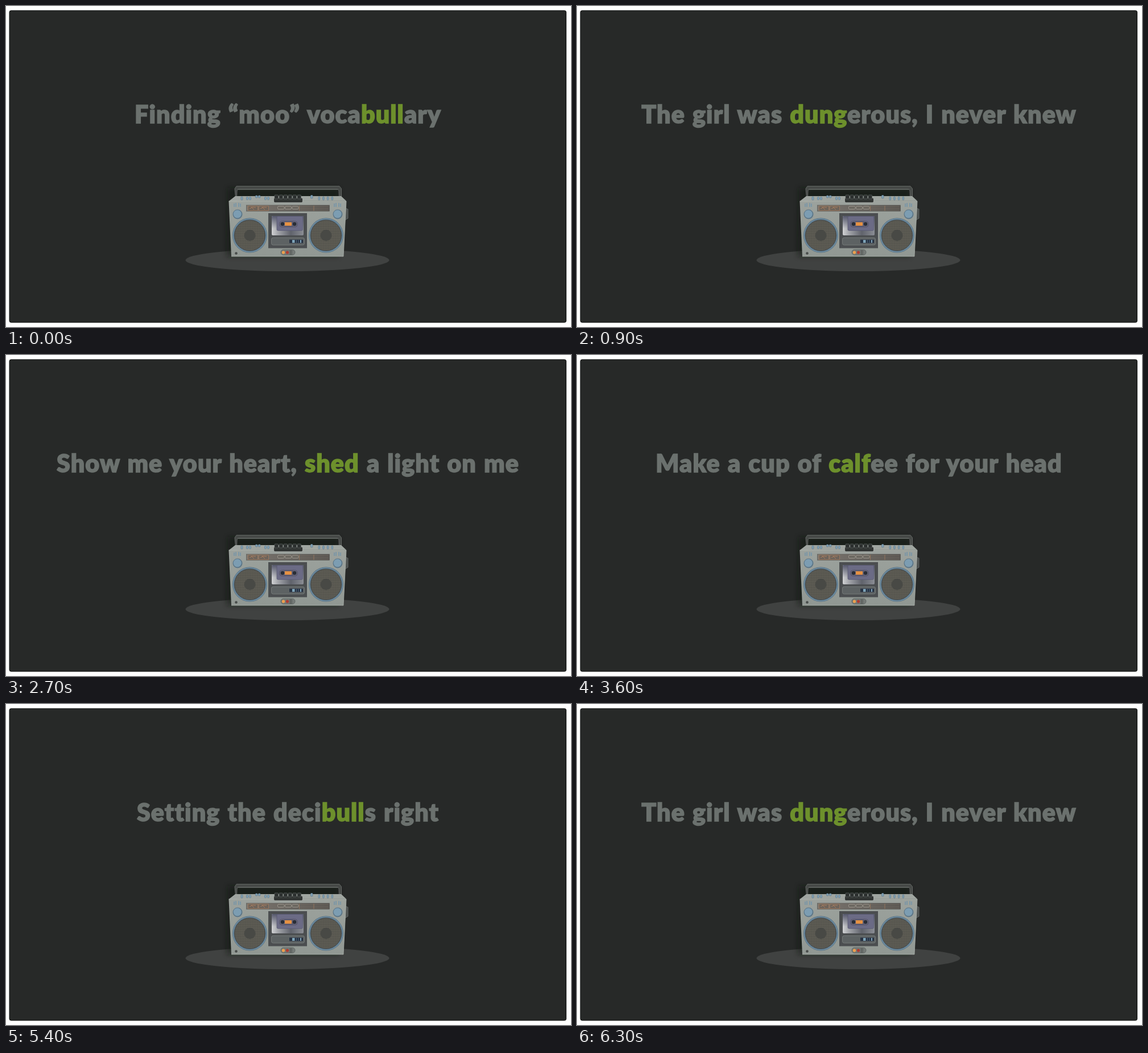
Animation of 993x564 px, one loop 7200 ms. Source, as an HTML page:

```html
<!DOCTYPE html>
<html lang="en">
<head>
<meta charset="utf-8">
<title>Boombox lyrics</title>
<style>
  html, body { margin: 0; width: 100%; height: 100%; overflow: hidden; background: #fefefe; }
  svg { display: block; width: 100vw; height: 100vh; }
  #lyric { font: 900 43px Lato, sans-serif; letter-spacing: 1.1px; word-spacing: 2px; text-anchor: middle; white-space: pre; fill: #6b716e; stroke: #6b716e; stroke-width: 1.4px; }
  #lyric .pun { fill: #6d902c; stroke: #6d902c; }
</style>
</head>
<body>
<svg viewBox="0 0 993 564">
  <defs>
    <filter id="blur" x="-30%" y="-30%" width="160%" height="160%"><feGaussianBlur stdDeviation="4"/></filter>
    <pattern id="mesh" width="3" height="3" patternUnits="userSpaceOnUse">
      <rect width="3" height="3" fill="#57564f"/>
      <path d="M0 0h1v1h-1zM2 1h1v1h-1z" fill="#6b685e"/>
      <path d="M1 2h1v1h-1z" fill="#494a44"/>
    </pattern>
    <linearGradient id="front" x2="0" y2="1"><stop stop-color="#9ca29d"/><stop offset="1" stop-color="#919893"/></linearGradient>
    <linearGradient id="tuner"><stop stop-color="#7d7770"/><stop offset="1" stop-color="#56534f"/></linearGradient>
    <linearGradient id="glass"><stop stop-color="#d0d1d3"/><stop offset=".2" stop-color="#a3a5aa"/><stop offset=".6" stop-color="#60636c"/><stop offset="1" stop-color="#8a8d94"/></linearGradient>
    <linearGradient id="fade" x2="0" y2="1"><stop stop-color="#55586c"/><stop offset="1" stop-color="#55586c" stop-opacity="0"/></linearGradient>
    <g id="speaker">
      <circle r="30.5" fill="#526a7b"/>
      <circle r="29" fill="none" stroke="#6b899d" stroke-width="2"/>
      <circle r="27" fill="url(#mesh)" stroke="#45494a"/>
      <circle r="10" fill="#484945"/>
    </g>
    <g id="knob">
      <circle r="8.5" fill="#5c7688"/>
      <circle r="7" cx="-.3" cy="-.5" fill="#7c9db2"/>
      <path d="M-6-19v6M-3-20v7M2-20v7M5-19v6" stroke="#7594a8" stroke-width="1.600"/>
    </g>
  </defs>

  <rect x="6" y="8" width="978.500" height="548" rx="3" fill="#272928" stroke="#111312"/>
  <text id="lyric" x="495.5" y="205.5"></text>
  <ellipse cx="494.5" cy="446.5" rx="179" ry="19.500" fill="#404241"/>

  <path d="M390 320h196v120h-198z" fill="#101211" opacity=".5" filter="url(#blur)"/>
  <path d="M403.500 336L402 321l3-4.500h181l3.500 4.500v15h-4l-.5-12-2-2H408l-2 2-.5 12z" fill="#464947" stroke="#626663"/>
  <path d="M408 322.500h175" stroke="#6d716e" stroke-width=".8"/>

  <path d="M596 355l5 2v16l-5 3z" fill="#4d5150" stroke="#626765"/>
  <path d="M391.500 343L403 334h186l9 8.500z" fill="#9fa5a0"/>
  <path d="M391.500 343l206.500-.500-5 97.500H396z" fill="url(#front)"/>
  <path d="M391.500 343H598M396 440h197L598 343" fill="none" stroke="#b2b8b2" stroke-width=".7"/>
  <g id="buttons"></g>

  <rect x="422.500" y="350" width="146" height="10.500" fill="url(#tuner)" stroke="#595955" stroke-width=".7"/>
  <g fill="#6d645b" stroke="#a57b5e" stroke-width=".8">
    <path d="M425.500 351.500h17v8h-17zM444.500 351.500h17v8h-17z"/>
    <path d="M428 356q5-4 11-2m-8-1l5 5M447 356q5-4 11-2m-8-1l5 5" fill="none" stroke="#b98560"/>
  </g>
  <g fill="#6a665f" stroke="#aaa49a" stroke-width=".8">
    <rect x="477.500" y="352" width="11.500" height="5" rx="1.500"/>
    <rect x="490.500" y="352" width="11" height="5" rx="1.500"/>
    <rect x="503" y="352" width="11" height="5" rx="1.500"/>
  </g>
  <path d="M516 352.500h51M516 355.500h51M516 358.500h51" stroke="#7d7268" stroke-width=".6"/>
  <path d="M515.500 351v9M541 351v9" stroke="#a17d60" stroke-width=".8"/>

  <use href="#knob" x="407" y="366"/>
  <use href="#knob" x="583" y="366"/>
  <use href="#speaker" x="428.500" y="403"/>
  <use href="#speaker" x="562.500" y="403"/>

  <path d="M461 364h68v61.500h-68z" fill="#4b4e50"/>
  <rect x="467" y="369" width="56" height="34" rx="2" fill="url(#glass)"/>
  <rect x="467" y="369" width="56" height="22" rx="2" fill="url(#fade)"/>
  <rect x="476" y="369.500" width="45.500" height="25" rx="2" fill="#6b6b85" stroke="#565870" stroke-width=".7"/>
  <rect x="480" y="377.500" width="33" height="11.500" rx="5.500" fill="#5b596f"/>
  <path d="M490 380h12v6h-12z" fill="#e69142"/>
  <g fill="#292d38" stroke="#7b7c90" stroke-width=".8"><circle cx="486" cy="383" r="4"/><circle cx="507" cy="383" r="4"/></g>
  <rect x="466.500" y="407" width="58" height="13" rx="3" fill="#5d6263" stroke="#7b807f" stroke-width=".8"/>
  <path d="M498 410.500h24v6h-24z" fill="#263142"/>
  <path d="M503 411h4.500v5H503zM517 411h2v5h-2z" fill="#7fa4b9"/>
  <path d="M510.500 411v5M514 411v5" stroke="#4d687e"/>

  <rect x="483" y="428" width="25" height="9.500" rx="4.700" fill="#757a77" stroke="#59605e" stroke-width=".8"/>
  <circle cx="487.500" cy="433" r="2.700" fill="#eda04c"/>
  <circle cx="494.500" cy="433" r="2.700" fill="#ad3c32"/>
  <path d="M499.500 429v8M502 429v8" stroke="#4b504e"/>
  <circle cx="404.500" cy="434.500" r="2.300" fill="#484c4a"/>
</svg>
<script>
const STEP = 900;
// The highlighted pun stands between bars.
const [vocabulary, count, coffee, shed, decibels, danger] = [
  "Finding “moo” voca|bull|ary",
  "|Cow|nt on me like 1,2,3, I’ll be there",
  "Make a cup of |calf|ee for your head",
  "Show me your heart, |shed| a light on me",
  "Setting the deci|bull|s right",
  "The girl was |dung|erous, I never knew"
];
const lines = [vocabulary, danger, count, shed, coffee, shed, decibels, danger];
const lyric = document.getElementById("lyric");

const box = (x, y, w, h, fill, edge) =>
  `<rect x="${x}" y="${y}" width="${w}" height="${h}" rx="1" fill="${fill}" stroke="${edge}" stroke-width=".7"/>`;
const row = (n, x, gap, ...shape) =>
  Array.from({ length: n }, (_, i) => box(x + i * gap, ...shape)).join("");
const blue = ["#7fa1b6", "#5f798b"], dark = ["#2c302f", "#616664"];

document.getElementById("buttons").innerHTML =
  row(1, 413, 0, 335, 3, 6, ...blue) +
  row(2, 422.5, 5, 335.5, 3, 5, ...blue) +
  row(2, 438.5, 5, 333, 3.5, 4, ...blue) +
  row(2, 454.5, 5, 335.5, 3, 5, ...blue) +
  row(4, 549, 7.7, 335, 2.5, 6, ...blue) +
  row(1, 535.5, 0, 332.5, 3.5, 5.5, ...blue) +
  box(471.5, 338, 49, 6.5, "#303432", "#222") +
  row(6, 472, 8, 332, 6.5, 7, ...dark);

let shown;
function draw(now) {
  const line = lines[Math.floor(now / STEP) % lines.length];
  if (line !== shown) {
    const [before, pun, after] = line.split("|");
    lyric.innerHTML = `${before}<tspan class="pun">${pun}</tspan>${after}`;
    shown = line;
  }
  requestAnimationFrame(draw);
}
draw(performance.now());
</script>
</body>
</html>
```
